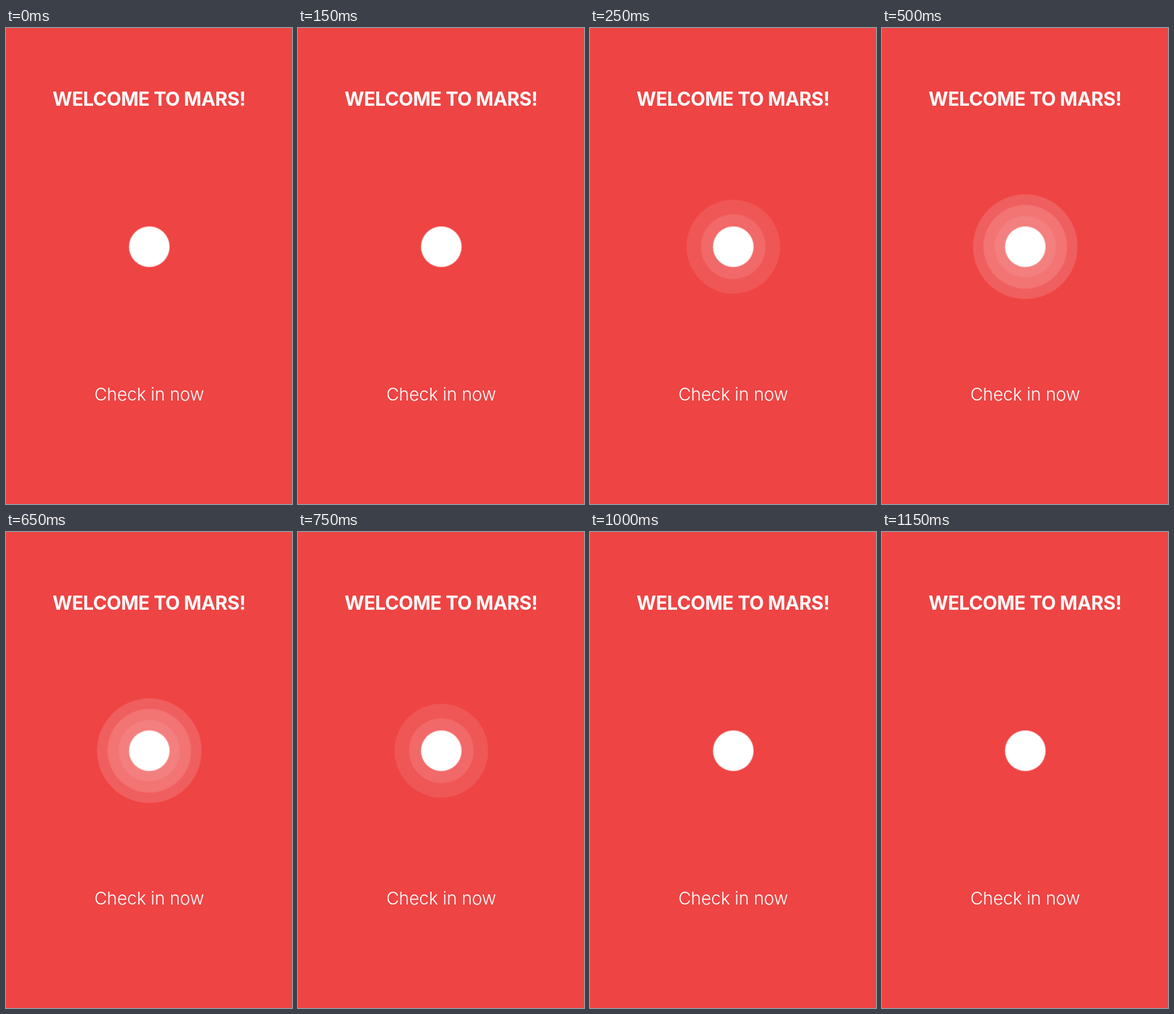
Write an HTML page that moves like this. It is 424 by 704 pixels and loops after 1.25 s.

```html
<!DOCTYPE html>
<html lang="en">
<head>
<meta charset="utf-8">
<title>Check in</title>
<style>
  html, body { margin: 0; width: 100%; height: 100%; overflow: hidden; background: #ee4443; }
  svg { display: block; width: 424px; height: 704px; }
  text { fill: #fff; text-anchor: middle; font-family: Raleway, Inter, sans-serif; }
  .title { font-size: 28px; font-weight: 700; letter-spacing: -.4px; }
  .action { font-size: 26px; font-weight: 300; letter-spacing: -.2px; }
  circle { fill: #fff; }
  .small, .large { opacity: 0; animation: 1250ms step-end infinite; }
  .small { animation-name: small; }
  .large { animation-name: large; }

  /* The pulse grows and shrinks in hard 250 ms steps. */
  @keyframes small {
    0%, 40%, 80%, 100% { opacity: 0; }
    20%, 60% { opacity: 1; }
  }
  @keyframes large {
    0%, 60%, 100% { opacity: 0; }
    40% { opacity: 1; }
  }
</style>
</head>
<body>
<svg viewBox="0 0 424 704">
  <text class="title" x="212" y="114.5">WELCOME TO MARS!</text>
  <g transform="translate(212.4 323.5)">
    <g class="small">
      <circle r="69.5" fill-opacity=".1"/>
      <circle r="48" fill-opacity=".11"/>
    </g>
    <g class="large">
      <circle r="77.5" fill-opacity=".15"/>
      <circle r="62" fill-opacity=".13"/>
      <circle r="45.5" fill-opacity=".08"/>
    </g>
    <circle r="30.1"/>
  </g>
  <text class="action" x="212.2" y="550.5">Check in now</text>
</svg>
</body>
</html>
```
